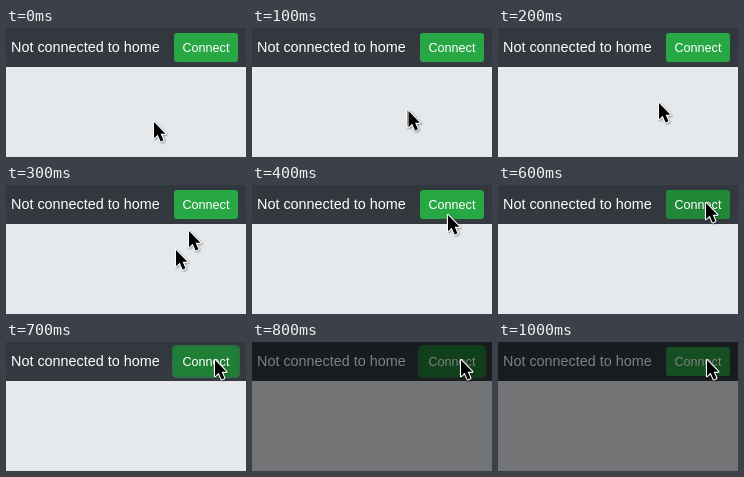
An HTML page with a canvas that plays this animation: 240 by 129 pixels, repeating every 6 s.

```html
<!DOCTYPE html>
<html lang="en">
<head>
<meta charset="utf-8">
<title>Connect button</title>
<style>
html, body { margin: 0; width: 100%; height: 100%; overflow: hidden; background: #e5e9ec; }
canvas { display: block; width: 100%; height: 100%; }
</style>
</head>
<body>
<canvas id="stage"></canvas>
<script>
const W = 240, H = 129, LOOP = 6000, STEP = 100;
const canvas = document.getElementById('stage');
const ctx = canvas.getContext('2d');
const ratio = window.devicePixelRatio || 1;
canvas.width = W * ratio;
canvas.height = H * ratio;

// Pointer tips per step; two tips mean the pointer was caught twice.
const path = [
  [[148, 94]],
  [[155, 82], [156.5, 83]],
  [[161, 75]],
  [[170, 65], [183, 46]],
  [[196, 30]],
  [[204.5, 21], [205.5, 19]],
  [[208, 18]],
  [[209, 18]]
];
const arrow = new Path2D('M0 0V16.2L3.7 12.8L6.6 19.4L9.5 18.2L6.6 11.8H11.4Z');

function box(x, y, w, h, r, color) {
  ctx.fillStyle = color;
  ctx.beginPath();
  ctx.roundRect(x, y, w, h, r);
  ctx.fill();
}

function label(text, x, y, size) {
  ctx.font = size + 'px "Liberation Sans", Arial, sans-serif';
  ctx.fillStyle = '#fff';
  ctx.fillText(text, x, y);
}

function drawPointer([x, y]) {
  ctx.save();
  ctx.translate(x, y);
  ctx.lineJoin = 'round';
  ctx.shadowColor = 'rgba(0,0,0,.35)';
  ctx.shadowBlur = 2 * ratio;
  ctx.shadowOffsetX = ctx.shadowOffsetY = ratio;
  ctx.strokeStyle = '#fff';
  ctx.lineWidth = 2.2;
  ctx.stroke(arrow);
  ctx.shadowColor = 'transparent';
  ctx.fillStyle = '#000';
  ctx.fill(arrow);
  ctx.restore();
}

function buttonColor(step) {
  if (step < 5) return '#28a745';
  if (step === 5) return '#269f42';
  if (step === 6) return '#218838';
  return step < 10 ? '#1f8035' : '#289f43';
}

function draw(time) {
  const step = Math.min(10, Math.floor((time % LOOP) / STEP));
  ctx.setTransform(ratio, 0, 0, ratio, 0, 0);
  ctx.fillStyle = '#e5e9ec';
  ctx.fillRect(0, 0, W, H);
  const bar = ctx.createLinearGradient(0, 0, 0, 39);
  bar.addColorStop(0, '#30373d');
  bar.addColorStop(1, '#343a40');
  ctx.fillStyle = bar;
  ctx.fillRect(0, 0, W, 39);

  label('Not connected to home', 5, 24, 14.4);
  if (step >= 7 && step < 10) box(166, 3, 68, 33, 4.5, 'rgba(40,167,69,.5)');
  box(168, 5, 64, 29, 3, buttonColor(step));
  label('Connect', 176.5, 24, 12.6);

  if (step >= 8) {
    ctx.fillStyle = 'rgba(0,0,0,.5)';
    ctx.fillRect(0, 0, W, H);
  }
  path[Math.min(step, path.length - 1)].forEach(drawPointer);
}

const start = performance.now();
function tick() {
  draw(performance.now() - start);
  requestAnimationFrame(tick);
}
tick();
</script>
</body>
</html>
```
